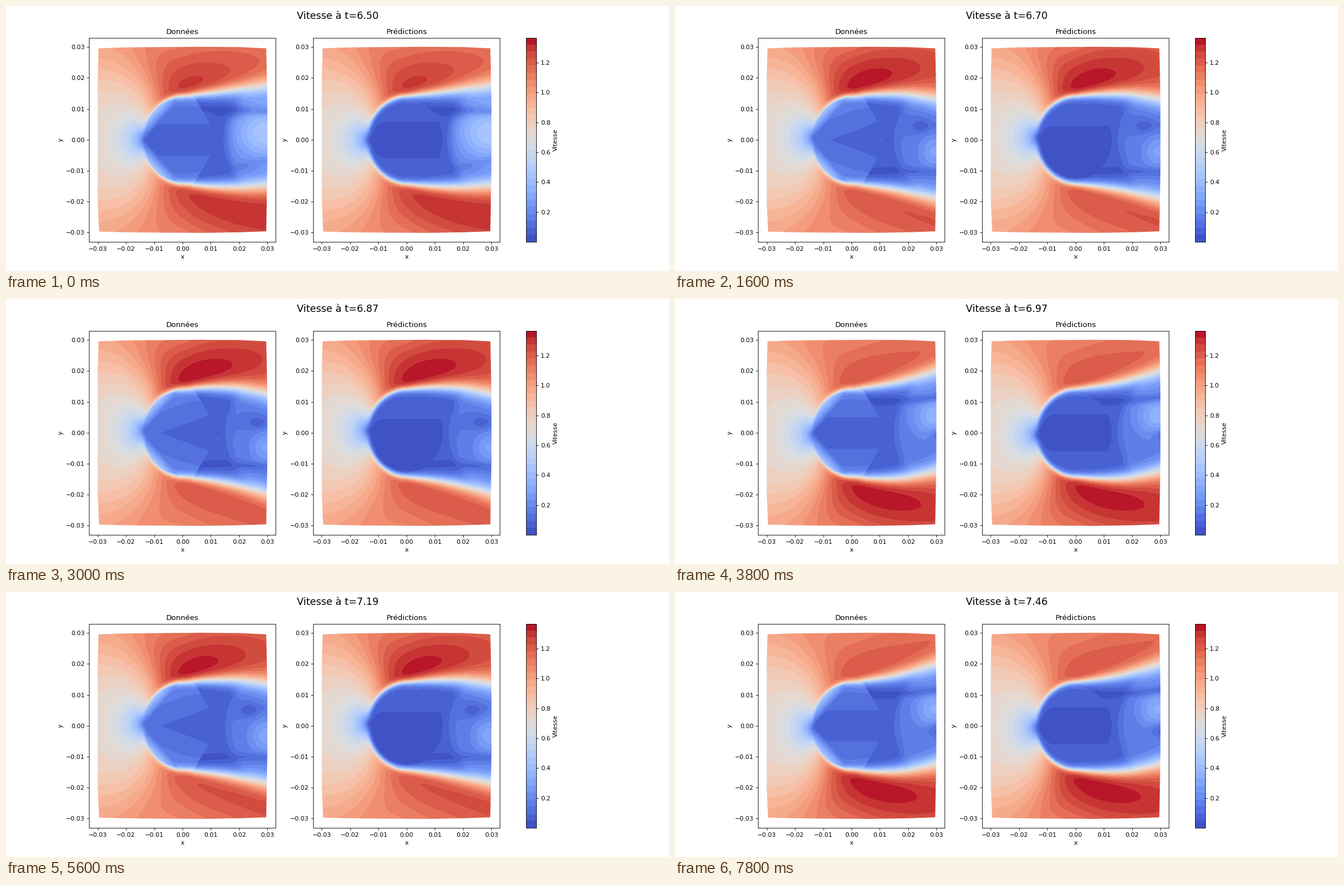
These frames come from a looping animation (1183x473 px, 8000 ms). A matplotlib script:

```python
import numpy as np
import matplotlib.pyplot as plt
from matplotlib.animation import FuncAnimation
from matplotlib.patches import Polygon

W, H, DPI = 1183, 473, 78.87
FRAMES, INTERVAL = 40, 200
T0, DT = 6.50, 0.0246          # simulated time of the first frame and step
CYCLE = 7 / 47                 # vortex shedding cycles per frame
VMAX, BANDS = 1.366, 29
R = 1.28                       # cylinder radius, in hundredths

plt.rcParams["font.family"] = "DejaVu Sans"
palette = plt.get_cmap("coolwarm")((np.arange(BANDS) + 0.5) / BANDS)[:, :3]

EDGE = 3.02
X, Y = np.meshgrid(np.linspace(-EDGE, EDGE, 304), np.linspace(-EDGE, EDGE, 334))
AY = np.abs(Y)
RAD = np.hypot(X, Y)
XP = np.maximum(X, 0)

# Outline of the sampled domain
HULL = [(-2.97, 2.96), (-2, 2.99), (-0.7, 3), (0.6, 3.01), (2, 3), (2.96, 2.96),
        (2.98, 2.2), (3, 1.2), (3, -0.9), (2.96, -2.96), (2, -2.99), (0.7, -3.01),
        (-1, -3), (-2, -2.99), (-2.95, -2.97), (-3, -2), (-3, 2)]


def wave(phase):
    return np.cos(2 * np.pi * phase)


def smooth(v):
    v = np.clip(v, 0, 1)
    return v * v * (3 - 2 * v)


def blob(cx, cy, sx, sy):
    return np.exp(-((X - cx) / sx) ** 2 - ((Y - cy) / sy) ** 2)


# Parts of the flow that do not change with time
FRONT = np.clip(1 + X / R, 0, 1)
WIDTH = np.where(X < 0, 0.08 + 0.04 * FRONT, 0.12 + 0.08 * XP)
REACH = np.where(X < 0, RAD, AY)
LAYER = np.where(X < 0, 1.36 + 0.06 * FRONT, 1.42 + 0.1 * XP - 0.013 * XP ** 2)
SWAY = 0.4 * (XP / 3) ** 2.5
FAN = (X + 0.9 + 0.35 * (AY - 1.4)) / (0.5 + 0.3 * np.maximum(AY - 1.4, 0))
RIDGE = np.exp(-((AY - 2 - 0.15 * X) / 1.3) ** 2) / (1 + np.exp(-2 * FAN))
INLET = (0.08 * (Y / 3) ** 2 - 0.04 * np.sin(np.pi * Y / 3) ** 2) * smooth((0.2 - X) / 1.8)
WAKE = 0.05 + 0.09 * smooth((X - 1.25 - 0.3 * Y ** 2) / 0.5)
CHORD = 0.72 * AY - 0.69 * X - 0.97
CORE = (X + 0.65 * AY < 1.3) & (CHORD < 0.1)
DISC = RAD < R


def wake_speed(p, side, centre):
    pulse = wave(2 * (p - 0.03))
    glow = blob(2.95, -0.55 * wave(p - 0.13), 0.9 - 0.35 * pulse, 0.75 - 0.2 * pulse)
    v = WAKE + (0.24 - 0.09 * pulse) * glow * smooth((X - 1.2) / 0.8)
    # slow vortex core drifting downstream, alternately above and below
    q = (p + 0.25) % 0.5 - 0.25
    sign = 1 if (p + 0.25) % 1 < 0.5 else -1
    v = v * (1 - 0.6 * blob(2.45 + 4.7 * q + 4 * q * q, sign * (0.45 - 2.6 * q), 0.4, 0.22))
    strip = np.exp(-((AY - centre + 2.3 * WIDTH) / 0.14) ** 2) * smooth((X - 0.1) / 0.3)
    return v * (1 - 0.55 * strip * (0.5 + 0.5 * wave(side - 0.62)))


def speeds(p):
    """Speed fields of both panels at shedding phase p."""
    side = np.where(Y > 0, p, p + 0.5)
    ys = Y - 0.07 * wave(p - 0.05) * smooth(-X)
    r2 = (X + 0.74) ** 2 + ys ** 2 + 1e-3
    outer = 0.97 * np.hypot(1 + 0.54 * (X + 0.74) / r2, 0.54 * ys / r2) + INLET
    outer = outer + RIDGE * (0.18 + 0.07 * wave(side - 0.05 - (X - 0.3) / 13))

    centre = LAYER - SWAY * wave(side - 0.12)
    mix = 0.5 + 0.5 * np.tanh((REACH - centre) / WIDTH)
    inner = wake_speed(p, side, centre)
    tilt = smooth(0.5 + 2 * wave(p - 0.11))

    # measured data: coarse facets across the body
    half = 0.5 * (1 - tilt) + 0.35 * (X + 0.75) * tilt
    facets = 0.094 + 0.07 * (AY - half)
    data = mix * outer + (1 - mix) * np.where(CORE, facets, inner)
    fill = np.minimum(0.1 + 0.9 * CHORD, 0.45)
    data = np.where((CHORD > 0) & (X < 0.3), np.maximum(data, fill), data)

    # prediction: body at rest
    rest = 0.047 + 0.03 * (tilt * (Y - 0.45) + (1 - tilt) * (AY - 0.6))
    pred = mix * outer + (1 - mix) * np.where(DISC, rest, inner)
    return data, pred


def shade(v):
    return palette[np.clip(v / VMAX * BANDS, 0, BANDS - 1).astype(int)]


fig = plt.figure(figsize=(W / DPI + 1e-9, H / DPI + 1e-9), dpi=DPI, facecolor="white")
title = fig.suptitle("", fontsize=16)


def panel(left, name):
    ax = fig.add_axes([left, 0.11, 0.2815, 0.77])
    img = ax.imshow(np.ones(X.shape + (3,)), origin="lower", aspect="auto",
                    interpolation="nearest", extent=np.array([-1, 1, -1, 1]) * EDGE / 100)
    img.set_clip_path(Polygon(np.array(HULL) / 100, transform=ax.transData))
    ticks = np.arange(-3, 4) / 100
    ax.set(xlim=(-0.033, 0.033), ylim=(-0.033, 0.033), xticks=ticks, yticks=ticks,
           xlabel="x", ylabel="y", title=name)
    return img


images = [panel(0.1255, "Données"), panel(0.4635, "Prédictions")]

bar = fig.add_axes([0.7842, 0.11, 0.0156, 0.77])
bar.imshow(palette[:, None], origin="lower", aspect="auto", interpolation="nearest",
           extent=(0, 1, 0, VMAX))
bar.yaxis.tick_right()
bar.yaxis.set_label_position("right")
bar.set(xticks=[], yticks=np.arange(1, 7) * 0.2, ylabel="Vitesse")


def update(i):
    title.set_text(f"Vitesse à t={T0 + DT * i:.2f}")
    for img, v in zip(images, speeds(CYCLE * (i - 8))):
        img.set_data(shade(v))
    return [title, *images]


anim = FuncAnimation(fig, update, frames=FRAMES, interval=INTERVAL,
                     init_func=lambda: update(0), repeat=True, repeat_delay=0)
plt.show()
```
